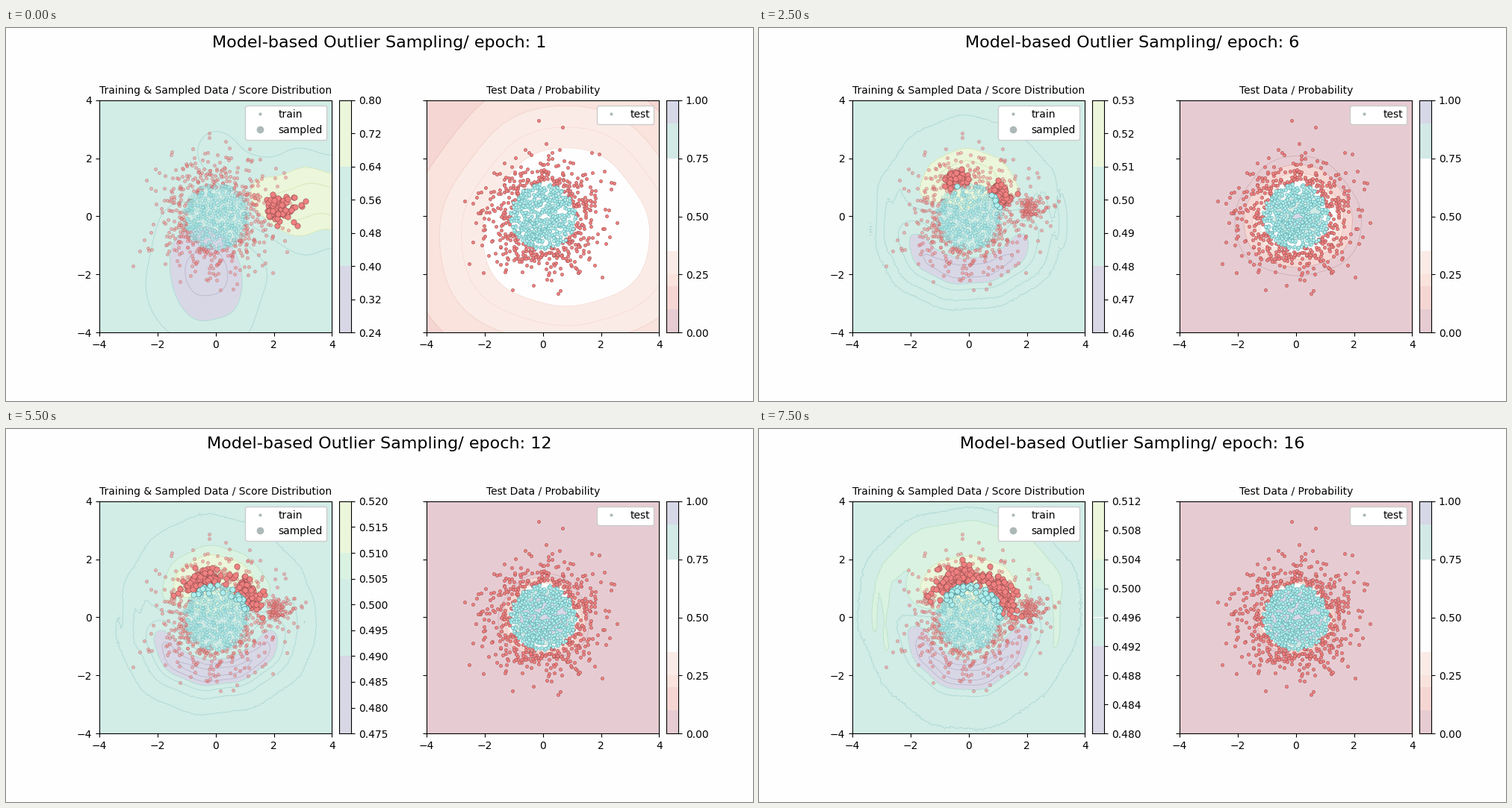
A matplotlib script that plays this animation: 1000 px wide and 500 px high, repeating every 8000 ms.

```python
import numpy as np
import matplotlib.pyplot as plt
from matplotlib.animation import FuncAnimation
from matplotlib.ticker import MaxNLocator
from mpl_toolkits.axes_grid1 import make_axes_locatable

PAPER = "#fefefe"
RED, RED_EDGE = "#f08080", "#a05050"
CYAN, CYAN_EDGE = "#afeeee", "#62a8aa"
GREY = "#adb8b8"
EPOCHS = 16

# score bands: upper limit as a share of the scale, fill, contour line
BANDS = [(.33, "#d8d7e5", "#b3aecb"), (.65, "#d2ece6", "#a3d4d0"),
         (.75, "#daf2e1", "#b0dfc0"), (1, "#ebf6da", "#cfe3b0")]

# probability bands from low to high, and the growth rate of each contour
PROB = ["#e6ccd2", "#f5d6d3", "#f9e3dc", "#fbebe6", PAPER, "#d2e9e6", "#d7d8e7"]
PROB_AT = [0, .1, .2, .25, .35, .75, .9, 1]
PROB_LINE = ["#cfa5ae", "#e0a8a8", "#ecc0b6", "#f2cfc6", "#f5d8d0", "#9fd2ce", "#b3aecb"]
GROWTH = [10.5, 7.3, 4.25, 3.2, 1.72, -3.5, -9]

# lowest and highest score at a few epochs
KEYS = [1, 4, 6, 9, 13, 16]
LOWEST = [.26, .433, .4615, .470, .481, .4815]
HIGHEST = [.78, .545, .5275, .5175, .516, .5105]

fig, (left, right) = plt.subplots(1, 2, figsize=(10, 5), dpi=100, sharey=True,
                                  facecolor=PAPER, gridspec_kw={"wspace": .3})
for ax, name in ((left, "Training & Sampled Data / Score Distribution"),
                 (right, "Test Data / Probability")):
    ax.set(xlim=(-4, 4), ylim=(-4, 4), xticks=range(-4, 5, 2),
           yticks=range(-4, 5, 2), aspect="equal")
    ax.set_title(name, fontsize=10)
lbar, rbar = (make_axes_locatable(ax).append_axes("right", "5%", pad=.1)
              for ax in (left, right))
title = fig.suptitle("", fontsize=16)


# ---------- points ----------
rng = np.random.default_rng(11)


def polar(r, a):
    return np.column_stack([r * np.cos(a), r * np.sin(a)])


def halo(n, r0, sigma=.9):
    """Normal cloud with everything nearer than r0 left out."""
    r = np.sqrt(r0 ** 2 - 2 * sigma ** 2 * np.log(rng.uniform(size=n)))
    return polar(r, rng.uniform(0, 2 * np.pi, n))


def disc(n, radius):
    return polar(radius * np.sqrt(rng.uniform(size=n)), rng.uniform(0, 2 * np.pi, n))


def dots(ax, pts, color, edge, s=9, **kw):
    return ax.scatter(pts[:, 0], pts[:, 1], s=s, c=color, edgecolors=edge,
                      linewidths=.4, **kw)


dots(left, halo(480, 1.0), RED, RED_EDGE, alpha=.5, zorder=2)
dots(left, disc(480, 1.13), CYAN, CYAN_EDGE, alpha=.5, zorder=2)
dots(right, halo(480, 1.1), RED, RED_EDGE, zorder=2)
dots(right, disc(500, 1.13), CYAN, CYAN_EDGE, zorder=2)

cluster = np.column_stack([1.75 + rng.gamma(2, .22, 100), rng.normal(.3, .22, 100)])
faded = dots(left, cluster, RED, RED_EDGE, alpha=.5, zorder=2)

# samples gather on two lobes that widen and merge with each epoch
born = np.repeat(np.arange(2, EPOCHS + 1), 36)
lobe = rng.choice([36, 108], born.size)
samples = polar(rng.normal(1.36, .08 + .012 * born),
                np.radians(lobe + rng.normal(0, 5 + .9 * born)))


# ---------- score panel ----------
X, Y = np.meshgrid(np.linspace(-4, 4, 170), np.linspace(-4, 4, 170))
R, A = np.hypot(X, Y), np.arctan2(Y, X)
GRAIN = rng.normal(0, .003, X.shape)


def bump(x, y, sx, sy):
    return np.exp(-(x / sx) ** 2 - (y / sy) ** 2)


def early_score():
    wavy = .12 * np.sin(3 * X + Y)
    return (.5 + .42 * bump(np.minimum(X - 2.6, 0), Y - .5 + wavy, 1.95, 1.3)
            - .42 * bump(X + .3 + wavy, Y + 1.9, 1.59, 2.07)
            + .12 * bump(X, Y - 2.2, .9, 1))


def late_score(e):
    r = R * (1 + .03 * np.sin(3 * A + e) + .012 * np.sin(11 * A + 2 * e))
    tilt = np.sin(A)
    low_width = .45 + .25 * np.exp((4 - e) / 2)
    ridge = np.where(tilt > 0, np.exp(-((r - 1.6) / .85) ** 2),
                     np.exp(-((r - 1.95) / low_width) ** 2))
    late = np.clip((e - 12) / 4, 0, 1)
    ripple = 1 + .25 * np.sin(14 * X + e) * np.exp(-Y ** 2)
    rim = np.exp(-((r - 3.1) / .5) ** 2) * ripple * (1 + .4 * late * (1 + tilt))
    return (.48 + .45 * np.tanh(1.5 * tilt) * ridge + .11 * rim
            + .2 * bump(X + .1, Y - .3, .75, .75) + GRAIN)


def band(share):
    return next(b for b in BANDS if share <= b[0])


def bar(ax, edges, colors, ticks, labels):
    ax.cla()
    for lo, hi, color in zip(edges, edges[1:], colors):
        ax.axhspan(lo, hi, color=color, lw=0)
    ax.set(xlim=(0, 1), ylim=(0, 1), xticks=[])
    ax.yaxis.tick_right()
    ax.set_yticks(ticks, labels)


def draw_score(e):
    values = MaxNLocator(8).tick_values(np.interp(e, KEYS, LOWEST),
                                        np.interp(e, KEYS, HIGHEST))
    n = len(values) - 1
    edges = np.arange(n + 1) / n
    shades = [band((i + .5) / n) for i in range(n)]
    colors = [s[1] for s in shades]
    digits = 2 if np.allclose(values, np.round(values, 2)) else 3
    bar(lbar, edges, colors, edges, [f"{v:.{digits}f}" for v in values])

    w = np.clip((4 - e) / 3, 0, 1)
    score = np.clip(w * early_score() + (1 - w) * late_score(e), .01, .99)
    live.append(left.contourf(X, Y, score, edges, colors=colors, zorder=.5))
    live.append(left.contour(X, Y, score, edges[1:-1], linewidths=.5, zorder=1,
                             colors=[s[2] for s in shades[1:]]))


# ---------- probability panel ----------
def ring(radius, shrink):
    a = np.linspace(0, 2 * np.pi, 180)
    r = radius * (1 + .04 * np.cos(3 * a - np.pi / 2 - np.pi) + .01 * np.sin(7 * a))
    return polar(r, a) * (1, .95) + np.array([.8, -.45]) * shrink


def draw_prob(e):
    shrink = e ** -1.3
    for growth, color, edge in zip(GROWTH, PROB[:1] + PROB[1:], PROB_LINE):
        radius = 1.15 + growth * shrink
        if radius > 0:
            x, y = ring(radius, shrink).T
            live.extend(right.fill(x, y, fc=color, ec=edge, lw=.5, zorder=1))
    live.extend(right.plot(*ring(1.15 + 2.45 * shrink, shrink).T, color=PROB_LINE[4],
                           lw=.5, zorder=1))


right.set_facecolor(PROB[0])
quarters = np.arange(5) / 4
bar(rbar, PROB_AT, PROB, quarters, [f"{q:.2f}" for q in quarters])

# ---------- legends ----------
for ax, names in ((left, ("train", "sampled")), (right, ("test",))):
    for name in names:
        ax.scatter([], [], s=36 if name == "sampled" else 4, color=GREY, label=name)
    ax.legend(loc="upper right", framealpha=1, scatteryoffsets=[.5]).set_zorder(5)

live = []


def draw(i):
    e = i + 1
    while live:
        live.pop().remove()
    title.set_text(f"Model-based Outlier Sampling/ epoch: {e}")
    draw_score(e)
    draw_prob(e)
    faded.set_visible(e > 1)
    picked = cluster if e == 1 else samples[born <= e]
    core = np.hypot(*picked.T) < 1.13
    live.append(dots(left, picked[~core], RED, "#8c4a4a", s=28, zorder=3))
    live.append(dots(left, picked[core], CYAN, "#3f7f82", s=28, zorder=3))
    return live


anim = FuncAnimation(fig, draw, frames=EPOCHS, init_func=lambda: draw(0), interval=500,
                     repeat=True, blit=False)
plt.show()
```
